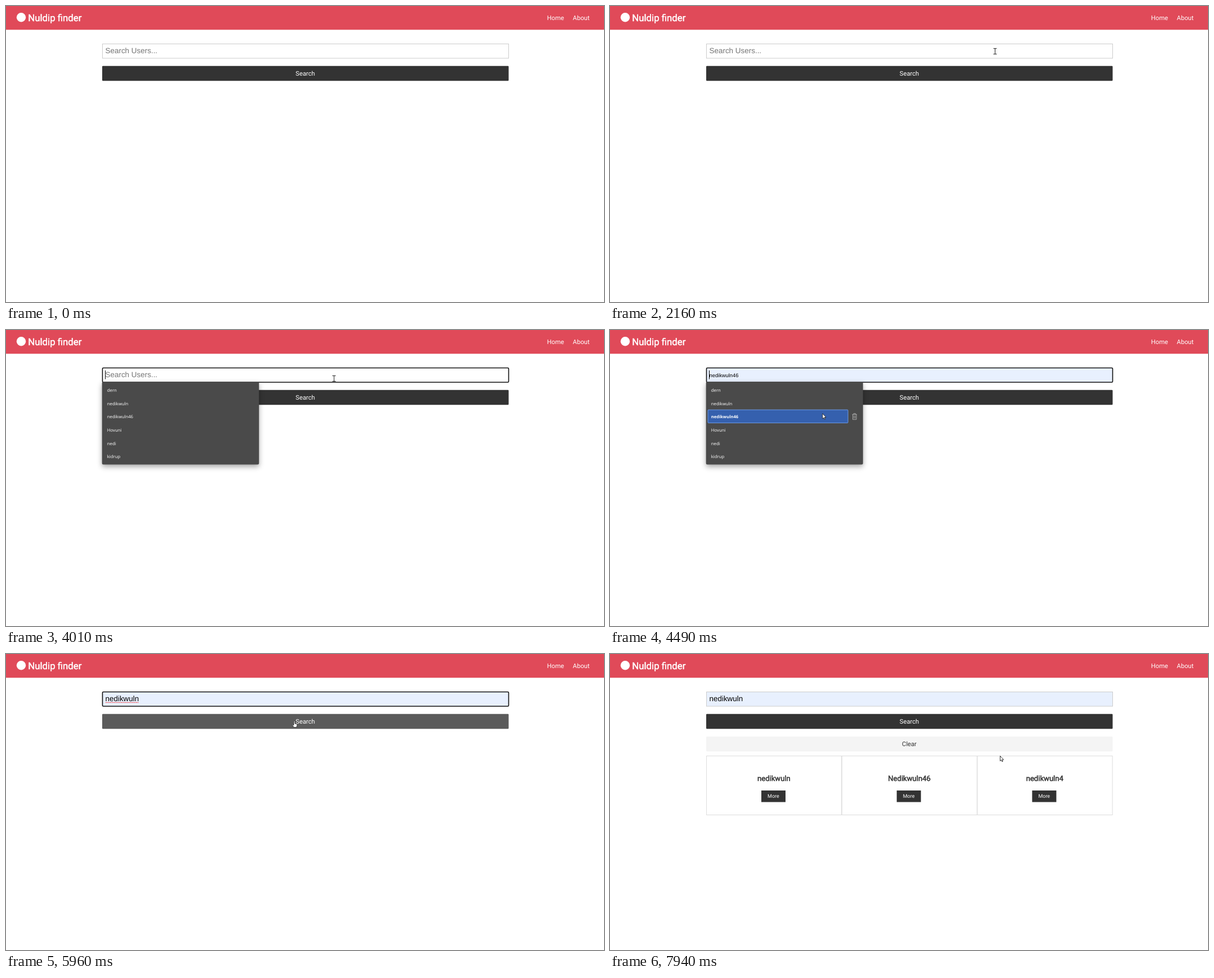
Write an HTML page that moves like this. It is 1063 px wide and 527 px high and loops after 8 s.

```html
<!DOCTYPE html>
<html lang="en">
<head>
<meta charset="utf-8">
<title>Nuldip finder</title>
<style>
  html, body { margin: 0; width: 100%; height: 100%; overflow: hidden; background: #fff; }
  svg { display: block; width: 100vw; height: 100vh; }
  text { font: 11.2px Roboto, sans-serif; text-rendering: geometricPrecision; white-space: pre; }
  .mid { text-anchor: middle; }
  .white { fill: #fff; }
  .dark { fill: #333; }
  .bold { stroke-width: .5px; paint-order: stroke; }
  .title { font-size: 16.8px; stroke: #fff; }
  .name { font-size: 13.1px; stroke: #333; }
  .more { font-size: 8.96px; }
  .field { font: 13.44px "Liberation Sans", Arial, sans-serif; }
  .preview { font-size: 9.33px; }
  .item { font: 7.75px "Open Sans", "Noto Sans", sans-serif; fill: #fff; }
  .item.on { font-weight: 700; font-size: 7.5px; }
  #list { filter: drop-shadow(0 4px 5px rgba(0, 0, 0, .35)); }
  #cursor path { stroke-linejoin: round; }
</style>
</head>
<body>
<svg viewBox="0 0 1063 527" preserveAspectRatio="none">
  <rect width="1063" height="42.3" fill="#e04a59"/>
  <circle class="white" cx="27" cy="20.3" r="8.2"/>
  <text class="title bold white" x="39.3" y="27">Nuldip finder</text>
  <text class="white" x="961.8" y="25">Home</text>
  <text class="white" x="1007.6" y="25">About</text>

  <rect id="box" x="171.5" y="67.5" width="722" height="25.5"/>
  <text id="field" class="field" x="176.5" y="84.3"></text>
  <path id="squiggle" d="M177 86.3H235.5" stroke="#e33" stroke-dasharray="2 .7" fill="none"/>
  <rect id="caret" y="72" width="1" height="15.5"/>

  <rect id="search" class="dark" x="171" y="106.7" width="722.5" height="26.6" rx="1.4"/>
  <text class="mid white" x="532" y="124">Search</text>

  <g id="spinner" transform="translate(532.2 216.5)" stroke-width="3.1" stroke-linecap="round"></g>

  <g id="results">
    <rect id="clear" x="171" y="147" width="722.5" height="26.4" rx="1.4" fill="#f4f4f4"/>
    <text class="mid dark" x="532" y="164">Clear</text>
  </g>

  <g id="list">
    <rect x="170.7" y="92" width="279" height="147.5" rx="2.5" fill="#4a4a4a"/>
    <g id="mark">
      <rect x="174" y="142.1" width="249" height="23.3" rx="1" fill="#3560ae" stroke="#6d9be6"/>
      <path d="M430.5 150.3H439M433 150V148.8H436.5V150M431.5 150.5V159.3H438V150.5M433.6 152.3V157.5M435.9 152.3V157.5"
        fill="none" stroke="#b4b4b4" stroke-width=".9"/>
    </g>
  </g>

  <g id="cursor">
    <path id="arrow" d="M.5 .5V9.5L2.5 7.7 4 10.8 5.3 10.2 3.9 7.2H6.7Z" fill="#fff" stroke="#222" stroke-width=".9"/>
    <path id="hand" d="M-1 1Q0-.3 1 1V5L4 5.6Q5 6 4.8 7.5L4 11.5H-1L-3.4 7.5Q-3 6.3-1.8 7L-1 8Z"
      fill="#fff" stroke="#222" stroke-width=".8"/>
    <path id="beam" d="M-3-5H3M-3 5H3M0-5V5" fill="none" stroke="#222"/>
    <circle id="click" r="8.5" fill="#ff0" opacity=".52"/>
  </g>
</svg>
<script>
const LOOP = 8000;
const NS = 'http://www.w3.org/2000/svg';
const $ = id => document.getElementById(id);
const NAMES = ['dern', 'nedikwuln', 'nedikwuln46', 'Hovuni', 'nedi', 'kidrup'];
const CARDS = ['nedikwuln', 'Nedikwuln46', 'nedikwuln4'];
const ROW = 23.7;

// Bursts of screen updates: start, end, number of steps
const BURSTS = [
  [380, 1150, 11], [1220, 1620, 6], [1770, 1870, 2], [2080, 2240, 3], [2770, 2860, 2],
  [3320, 3320, 1], [3720, 4490, 11], [4560, 4790, 4], [4940, 5730, 11], [5800, 6100, 5],
  [6250, 7040, 11], [7110, 7190, 2], [7390, 7940, 10]
];

// Pointer path: time, x, y
const PATH = [
  [380, 919, 400], [610, 812, 305], [860, 722, 214], [1150, 673, 166],
  [1220, 674, 156], [1300, 676, 130], [1380, 678, 112], [1460, 680, 98], [1620, 682, 85],
  [1870, 682.3, 84.3], [2080, 683, 83], [2240, 686, 78.3],
  [3720, 680, 78.5], [4030, 550, 89], [4180, 446, 104], [4340, 395, 131], [4490, 377.3, 148.3],
  [4560, 375, 145], [4790, 368.5, 129.5], [5260, 368, 129], [5730, 490, 121], [6100, 528, 117.5],
  [6640, 528, 117.5], [6960, 526, 136], [7040, 525.3, 149],
  [7110, 535, 158], [7190, 548, 164], [7390, 566, 167], [7700, 646, 172], [7940, 693, 181]
];

// Hover strength of the search button
const HOVER = [
  [1220, 0], [1300, .2], [1380, .2], [1460, 0],
  [4940, 0], [5160, 1], [6960, 1], [7040, .76], [7110, .3], [7190, 0]
];

function add(parent, tag, attrs, text = '') {
  const el = document.createElementNS(NS, tag);
  for (const key in attrs) el.setAttribute(key, attrs[key]);
  el.textContent = text;
  return parent.appendChild(el);
}

const set = (id, attrs) => {
  for (const key in attrs) $(id).setAttribute(key, attrs[key]);
};
const show = (id, on) => { $(id).style.display = on ? '' : 'none'; };
const within = (t, a, b) => t >= a && t < b;

function snap(t) {
  let time = 0;
  for (const [a, b, n] of BURSTS) {
    if (t < a) break;
    const step = n > 1 ? (b - a) / (n - 1) : 0;
    time = step ? a + step * Math.min(n - 1, Math.floor((t - a) / step + 1e-6)) : a;
  }
  return time;
}

function sample(keys, t) {
  if (t <= keys[0][0]) return keys[0].slice(1);
  const i = keys.findIndex(k => k[0] > t);
  if (i < 0) return keys[keys.length - 1].slice(1);
  const a = keys[i - 1], b = keys[i];
  const f = (t - a[0]) / (b[0] - a[0]);
  return a.slice(1).map((v, j) => v + (b[j + 1] - v) * f);
}

const items = NAMES.map((name, i) =>
  add($('list'), 'text', { class: 'item', x: 179.8, y: 109.9 + i * ROW }, name));

const spokes = Array.from({ length: 12 }, (_, i) =>
  add($('spinner'), 'path', { d: 'M0-9.2V-14.3', transform: `rotate(${i * 30})` }));

CARDS.forEach((name, i) => {
  const g = add($('results'), 'g', { transform: `translate(${171 + i * 240.7} 181)` });
  add(g, 'rect', { x: .5, y: .5, width: 240.2, height: 105, fill: 'none', stroke: '#ddd' });
  add(g, 'text', { class: 'mid name bold dark', x: 120.4, y: 44.6 }, name);
  add(g, 'rect', { class: 'dark', x: 98, y: 62, width: 43, height: 20.6 });
  add(g, 'text', { class: 'mid more white', x: 119.4, y: 75.3 }, 'More');
});

function pointerKind(x, y, open, done) {
  if (x < 171 || x > 893) return 'arrow';
  if (y > 67 && y < 93) return 'beam';
  if (open && x < 450 && y < 239) return 'arrow';
  if (within(y, 107, 133.3) || done && within(y, 147, 173.4)) return 'hand';
  return 'arrow';
}

function render(now) {
  const t = snap(now);
  const [x, y] = sample(PATH, t);
  const open = within(t, 2770, 4940);
  const focus = within(t, 2770, 6250);
  const chosen = t >= 4940;
  const done = t >= 7390;
  const moved = within(t, 3760, 4940);

  const inList = open && moved && x < 450 && y > 95;
  const row = inList ? Math.floor((y - 94.7) / ROW) : -1;
  const preview = row >= 0;

  // Input
  const filled = chosen || preview;
  set('box', {
    fill: filled ? '#e8f0fe' : '#fff',
    stroke: focus ? '#101010' : '#ccc',
    'stroke-width': focus ? 1.6 : 1,
    rx: focus ? 1.6 : 0
  });
  $('field').textContent = chosen ? NAMES[1] : preview ? NAMES[row] : 'Search Users...';
  set('field', {
    class: preview ? 'field preview' : 'field',
    fill: filled ? '#000' : '#757575'
  });
  show('squiggle', chosen && focus);
  show('caret', within(t, 2770, 3320) || within(t, 3850, 5470) || within(t, 6000, 6250));
  set('caret', { x: chosen ? 235.6 : 176 });

  // Suggestions
  const fade = open ? 1 : chosen ? Math.max(0, 1 - (t - 4860) / 200) : 0;
  show('list', fade > 0);
  $('list').style.opacity = fade;
  show('mark', preview);
  set('mark', { transform: `translate(0 ${(row - 2) * ROW})` });
  items.forEach((el, i) => el.classList.toggle('on', i === row));

  // Button, loader, results
  set('search', { opacity: 1 - .2 * sample(HOVER, t)[0] });
  show('spinner', within(t, 6330, 7390));
  const head = Math.floor((t - 7040) / 83 + 1e-6) + 1;
  const shades = ['#000', '#2c2c2c', '#707070', '#999', '#b5b5b5'];
  spokes.forEach((el, i) =>
    el.setAttribute('stroke', shades[((head - i) % 12 + 12) % 12] || '#cdcdcd'));
  show('results', done);

  // Pointer
  const kind = pointerKind(x, y, open, done);
  show('cursor', t >= 380);
  for (const id of ['arrow', 'hand', 'beam']) show(id, id === kind);
  show('click', within(t, 2770, 2850) || within(t, 4940, 5010) || within(t, 6250, 6320));
  set('cursor', { transform: `translate(${x} ${y})` });
  set('clear', { opacity: done && kind === 'hand' ? .8 : 1 });
}

const start = performance.now();
function tick() {
  render((performance.now() - start) % LOOP);
  requestAnimationFrame(tick);
}
tick();
</script>
</body>
</html>
```
